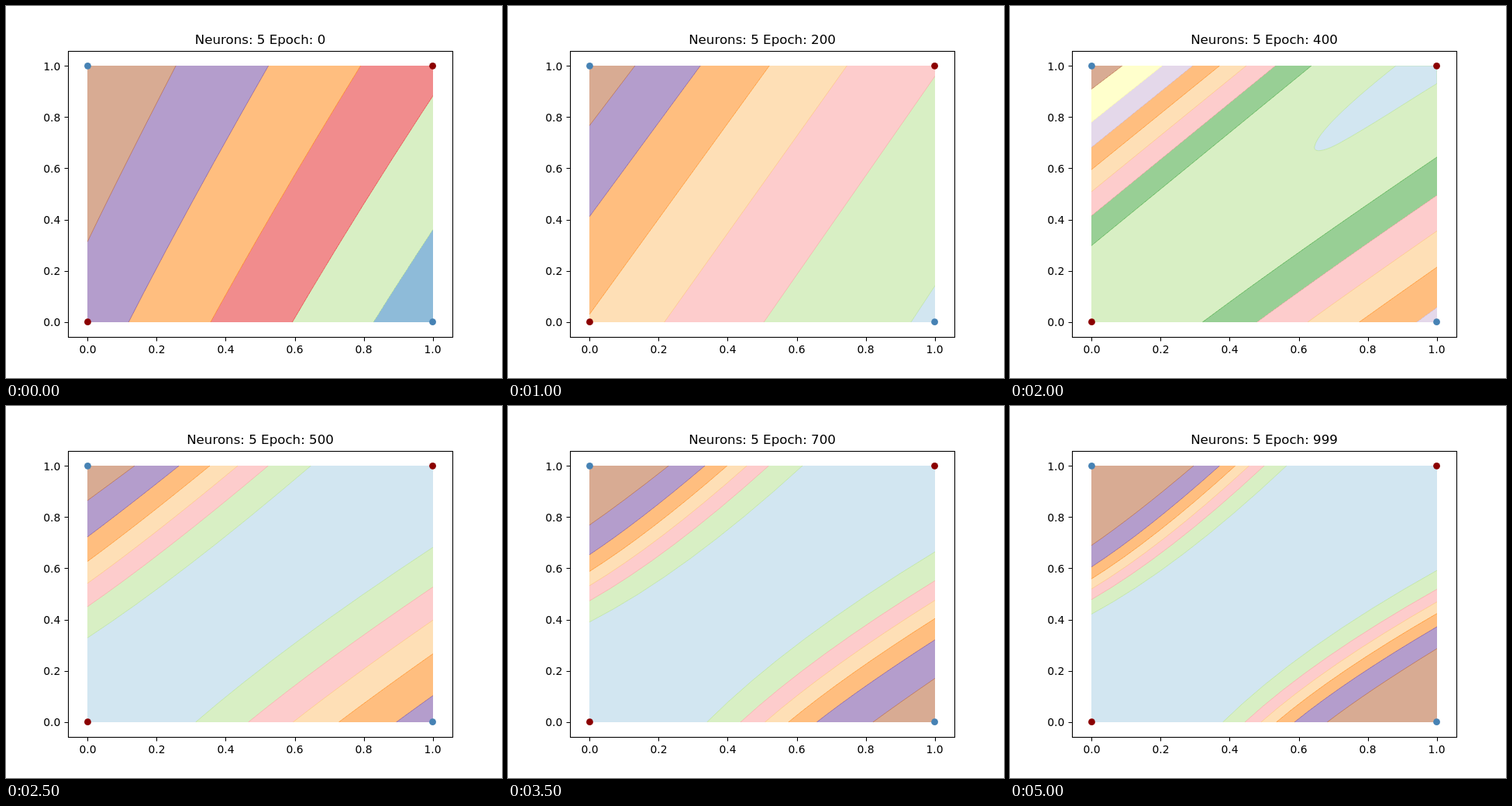
An HTML page that plays this animation: 640 px wide and 480 px high, repeating every 5.5 s.

```html
<!DOCTYPE html>
<html lang="en">
<head>
<meta charset="utf-8">
<title>Decision surface</title>
<style>
html, body { margin: 0; width: 100%; height: 100%; overflow: hidden; background: #fff; }
svg { display: block; width: 640px; height: 480px; font: 13.89px "DejaVu Sans", sans-serif; }
#bands path { shape-rendering: crispEdges; }
#bands .edge { fill: none; stroke-width: 1; stroke-opacity: .5; shape-rendering: auto; }
#axes path, #axes rect { fill: none; stroke: #000; stroke-width: 1.1; }
</style>
</head>
<body>
<svg viewBox="0 0 640 480">
  <clipPath id="plot"><rect x="105" y="77" width="446" height="331"/></clipPath>
  <rect width="640" height="480" fill="#fff"/>
  <g id="bands" clip-path="url(#plot)"></g>
  <g id="dots"></g>
  <g id="axes"><rect x="80.5" y="58.5" width="496" height="369"/></g>
  <text id="title" x="328" y="49" font-size="16.67" text-anchor="middle"></text>
</svg>
<script>
const HOLD = 500;
const LEFT = 105, RIGHT = 551, TOP = 77, BOTTOM = 408;
const W = RIGHT - LEFT, H = BOTTOM - TOP;
const PALETTE = ['#a6cee3', '#1f78b4', '#b2df8a', '#33a02c', '#fb9a99', '#e31a1c',
  '#fdbf6f', '#ff7f00', '#cab2d6', '#6a3d9a', '#ffff99', '#b15928'];
const byId = id => document.getElementById(id);
const lerp = (a, b, k) => a + (b - a) * k;
const logit = p => Math.log(p / (1 - p));

// A family of level curves around one corner. near and far hold the distance
// from that corner of the innermost and the outermost curve; the curves between
// sit at the logits of evenly spaced levels. bend is the innermost bulge in px.
const family = (bend, near, far, nearLevels = [.15, .93], farLevels = [.12, .91]) =>
  ({ bend, near, far, nearLevels, farLevels });

// slip: band whose colour index lies on a boundary and rounds down.
const start = {
  bands: 6, slip: 1,
  upper: family(42, [3.23, .687], [1.325, .256], [.45, .55], [.45, .55])
};
const tilted = {
  bands: 7,
  upper: family(0, [2.9, .234], [1.42, .132], [.07, .48], [.1, .5])
};
const pocket = {
  bands: 9, slip: 7,
  upper: family(3, [1.13, .1], [.727, .077], [.09, .7], [.16, .7]),
  blob: 'M525 77C470 155 422 215 422 262C422 285 440 293.5 462 293.5C490 293.5 520 284 551 274V77Z'
};
const valley = {
  bands: 9,
  upper: family(0, [.702, .092], [.637, .09], [.19, .84], [.19, .84]),
  lower: family(2, [.679, -.53], [.644, -.5], [.31, .935], [.31, .935]),
  blob: 'M498 77C450 115 398 160 393 181C391 190 405 188 425 177C465 155 510 125 551 100V77Z'
};
const wide = {
  bands: 7,
  upper: family(-11, [.641, .18], [.657, .184], [.13, .92], [.09, .9]),
  lower: family(10, [.695, .058], [.72, .06], [.15, .97], [.13, .96])
};
const narrow = {
  bands: 7,
  upper: family(-11, [.589, .266], [.59, .26]),
  lower: family(11, [.637, .261], [.627, .245])
};
const settled = {
  bands: 7,
  upper: family(-10, [.579, .311], [.565, .296]),
  lower: family(11, [.62, .318], [.592, .287])
};

const mixPair = (p, q, k) => p.map((v, i) => lerp(v, q[i], k));
const mixFamily = (a, b, k) => a && b && family(
  lerp(a.bend, b.bend, k),
  mixPair(a.near, b.near, k), mixPair(a.far, b.far, k),
  mixPair(a.nearLevels, b.nearLevels, k), mixPair(a.farLevels, b.farLevels, k));
const mix = (a, b, k) => ({
  bands: b.bands,
  upper: mixFamily(a.upper, b.upper, k),
  lower: mixFamily(a.lower, b.lower, k)
});

const STEPS = [
  start, mix(start, tilted, .5), tilted, pocket, valley,
  mix(valley, wide, .5), wide, mix(wide, narrow, .6),
  narrow, mix(narrow, settled, .58), settled
];

const bandColors = (n, slip) => Array.from({ length: n }, (_, i) =>
  PALETTE[Math.floor((2 * i + 1) * 6 / n) - (i === slip ? 1 : 0)]);

function spread([base, corner], [lo, hi], k) {
  const from = logit(lo), to = logit(hi);
  return lerp(base, corner, (logit(lerp(lo, hi, k)) - from) / (to - from));
}

function curvePath(ax, ay, bx, by, bend) {
  const dx = bx - ax, dy = by - ay, k = 2 * bend / Math.hypot(dx, dy);
  return `M${ax} ${ay}Q${ax + .4 * dx + dy * k} ${ay + .4 * dy - dx * k} ${bx} ${by}`;
}

const shape = (d, color) =>
  `<path d="${d}" fill="#fff"/><path d="${d}" fill="${color}" fill-opacity=".5"/>`;
const edge = (d, color) => `<path class="edge" d="${d}" stroke="${color}"/>`;

function cornerBands(fam, colors, isUpper) {
  if (!fam) return '';
  return colors.map((color, i) => {
    const k = i / (colors.length - 1);
    const near = spread(fam.near, fam.nearLevels, k);
    const far = spread(fam.far, fam.farLevels, k);
    if (near <= 0 || far <= 0) return '';
    const bend = fam.bend * (near / fam.near[0]) ** 2.5;
    const d = isUpper
      ? curvePath(LEFT, TOP + near * H, LEFT + far * W, TOP, bend)
      : curvePath(RIGHT - near * W, BOTTOM, RIGHT, BOTTOM - far * H, bend);
    const corner = isUpper ? `L${LEFT} ${TOP}Z` : `L${RIGHT} ${BOTTOM}Z`;
    return shape(d + corner, color) + edge(d, color);
  }).join('');
}

function surface({ bands, slip, upper, lower, blob }) {
  const colors = bandColors(bands, slip);
  const lowest = blob ? colors.shift() : null;
  const base = colors.shift();
  return shape(`M${LEFT} ${TOP}H${RIGHT}V${BOTTOM}H${LEFT}Z`, base)
    + (blob ? shape(blob, lowest) + edge(blob, base) : '')
    + cornerBands(upper, colors, true)
    + cornerBands(lower, colors, false);
}

function drawAxes() {
  const xAt = v => 105.45 + v * 445.1, yAt = v => 407.7 - v * 330.4;
  let out = '';
  for (let i = 0; i <= 5; i++) {
    const x = xAt(i / 5), y = yAt(i / 5), label = (i / 5).toFixed(1);
    out += `<path d="M${Math.round(x) + .5} 427.5v5M80.5 ${Math.round(y) + .5}h-5"/>`
      + `<text x="${x}" y="448" text-anchor="middle">${label}</text>`
      + `<text x="70.3" y="${Math.round(y + 5.2)}" text-anchor="end">${label}</text>`;
  }
  byId('axes').innerHTML += out;
  const dot = (x, y) => `<circle cx="${xAt(x)}" cy="${yAt(y)}" r="4.4" `
    + `fill="${x === y ? '#8b0000' : '#4682b4'}"/>`;
  byId('dots').innerHTML = dot(0, 0) + dot(0, 1) + dot(1, 0) + dot(1, 1);
}

let shown = -1;
function render(time) {
  const step = Math.floor(time / HOLD) % STEPS.length;
  if (step === shown) return;
  shown = step;
  byId('bands').innerHTML = surface(STEPS[step]);
  byId('title').textContent = `Neurons: 5 Epoch: ${Math.min(step * 100, 999)}`;
}

drawAxes();
render(0);
const began = performance.now();
requestAnimationFrame(function tick() {
  render(performance.now() - began);
  requestAnimationFrame(tick);
});
</script>
</body>
</html>
```
